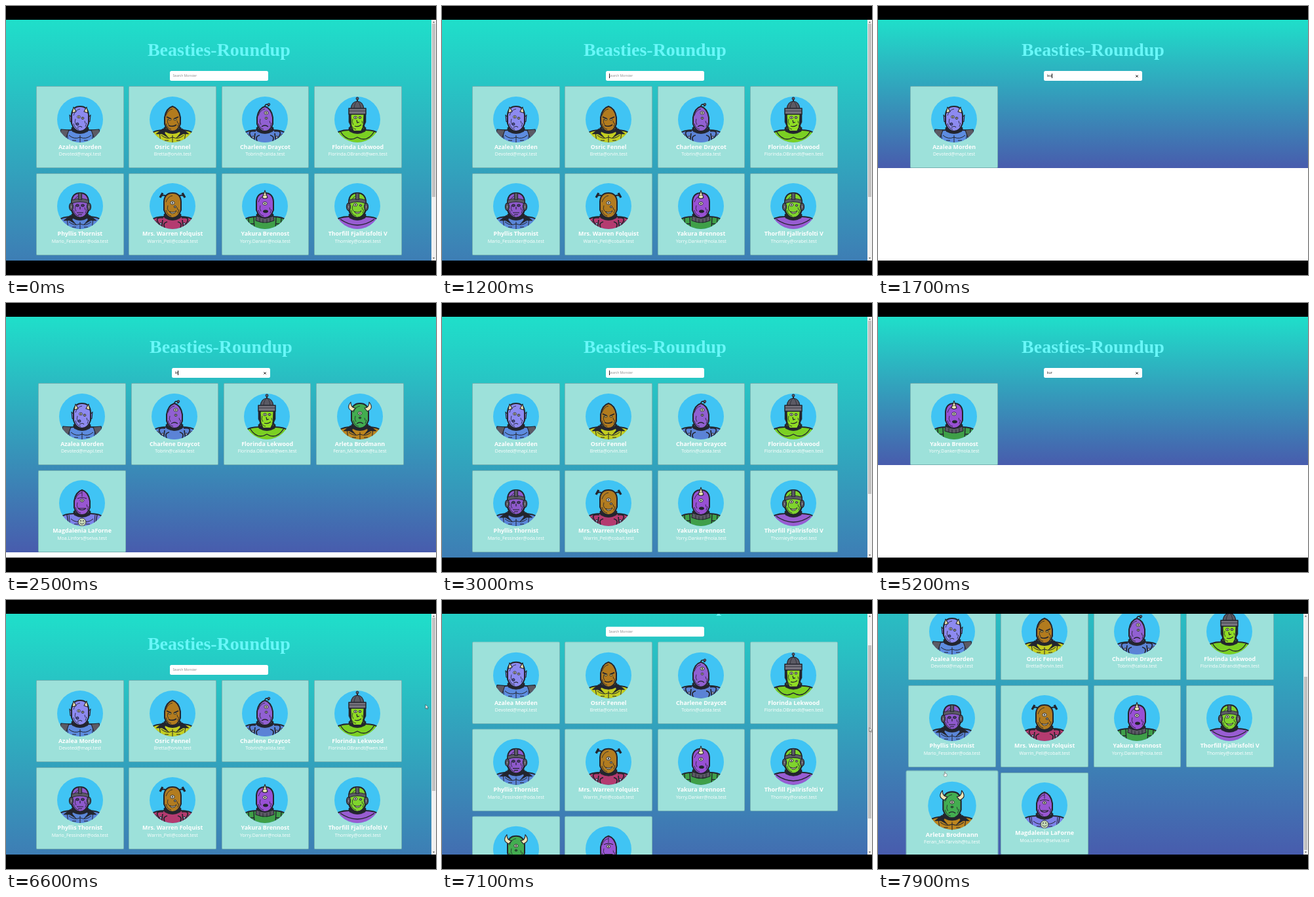
Write an HTML page that moves like this. It is 656 by 410 pixels and loops after 8000 ms.

```html
<!DOCTYPE html>
<html lang="en">
<head>
<meta charset="utf-8">
<title>Card search</title>
<style>
  html, body { margin: 0; width: 100%; height: 100%; overflow: hidden; background: #000; }
  #stage { position: relative; width: 656px; height: 410px; overflow: hidden; background: #000; font-family: "Open Sans", "Noto Sans", sans-serif; }
  #view { position: absolute; top: 21px; width: 656px; height: 367px; overflow: hidden; background: #fff; }
  #page { position: absolute; left: 0; top: 0; background: linear-gradient(#1fdfca, #485cad); }
  h1 { position: absolute; top: 29.6px; width: 100%; margin: 0; text-align: center; color: #68f7f8;
    font: bold 28px/32px "Liberation Serif", "Times New Roman", serif; }
  #box { position: absolute; top: 78px; left: calc(50% - 74.8px); width: 149.6px; height: 15px; box-sizing: border-box;
    padding-left: 4.6px; border-radius: 2.5px; background: #fff; font-size: 5.3px; line-height: 15px; color: #222; white-space: pre; }
  #hint { position: absolute; left: 4.6px; color: #8b8b8b; font-size: 5px; }
  #caret { display: inline-block; width: .8px; height: 7px; vertical-align: -1.6px; background: #111; }
  #clear { position: absolute; left: 139.4px; top: 5.6px; width: 4px; height: 4px; overflow: visible; }
  #grid { position: absolute; top: 101px; width: 100%; display: grid; grid-template-columns: repeat(4, 133.7px);
    grid-auto-rows: 125.4px; gap: 7.6px 7.6px; justify-content: center; }
  .card { position: relative; border-radius: 2px; background: #9de1da; color: #fff; text-align: center; white-space: nowrap;
    box-shadow: inset 0 0 0 .7px rgba(70, 120, 130, .6); }
  .card svg { position: absolute; left: 31.6px; top: 15.5px; width: 70px; height: 70px; border-radius: 50%; background: #40c4f4; }
  .card b, .card i { position: absolute; left: 0; width: 100%; }
  .card b { top: 86.5px; font: 700 8.9px/12px "Open Sans", "Noto Sans", sans-serif; }
  .card i { top: 99px; font: 400 7px/10px "Open Sans", "Noto Sans", sans-serif; }
  #bar { position: absolute; right: 0; top: 0; width: 7px; height: 367px; background: #f1f1f1; }
  #thumb { position: absolute; left: 1px; top: 6px; width: 5px; height: 264px; background: #c1c1c1; }
  #bar svg { position: absolute; left: 0; top: 0; }
  #mouse { position: absolute; left: 0; top: 0; width: 10px; height: 10px; overflow: visible; }
</style>
</head>
<body>
<div id="stage">
  <div id="view">
    <div id="page">
      <h1>Beasties-Roundup</h1>
      <div id="box"><span id="hint">Search Monster</span><span id="typed"></span><span id="caret"></span><svg id="clear" viewBox="0 0 4 4"><path d="M.3 .3 3.7 3.7M3.7 .3 .3 3.7" stroke="#222" stroke-width=".95"/></svg></div>
      <div id="grid"></div>
    </div>
    <div id="bar"><div id="thumb"></div><svg width="7" height="367"><path d="M1.8 4.5 3.5 2.5 5.2 4.5ZM1.8 362.5 3.5 364.5 5.2 362.5Z" fill="#555"/></svg></div>
  </div>
  <svg id="mouse"><path id="arrow" d="M0 0V6.2L1.5 4.9 2.4 7 3.4 6.6 2.5 4.5H4.4Z" fill="#fff" stroke="#222" stroke-width=".5"/><path id="hand" d="M-.6 0Q0-.9.6 0V2.4L3.2 3V5.2L2.4 7H-.7L-2.4 4.3-1.5 3.7-.6 4.5Z" fill="#fff" stroke="#555" stroke-width=".5"/></svg>
</div>
<script>
const $ = id => document.getElementById(id);
const INK = '#23252e', STEEL = '#5b5a64', BONE = '#f1e6b4';
const LOOP = 8000, TICK = 100;

// Small SVG helpers; avatars use a 70 by 70 box centred on 0,0
const path = (d, fill = 'none', w = 1.1) =>
  `<path d="${d}" fill="${fill}" stroke="${INK}" stroke-width="${w}" stroke-linejoin="round"/>`;
const oval = (x, y, rx, ry = rx, fill = '#fff', w = .9) =>
  `<ellipse cx="${x}" cy="${y}" rx="${rx}" ry="${ry}" fill="${fill}" stroke="${INK}" stroke-width="${w}"/>`;
const eye = (x, y, r = 2.4) => oval(x, y, r, r * .8, '#f3efd8') + oval(x, y, r * .35, r * .35, INK, .3);
const both = f => f(-1) + f(1);

const torso = fill => path('M-36 36V23Q-27 16-13 16L-10 10H10L13 16Q27 16 36 23V36Z', fill, 2)
  + path('M-13 12Q0 23 13 12L12 18Q0 25-12 18Z', INK, .8);
const skulls = {
  round: 'M-13-7Q-12-20 0-20Q12-20 13-7L13 6Q9 18 0 18Q-9 18-13 6Z',
  point: 'M-12-3Q-10-17 0-20Q10-17 12-3V7Q8 18 0 18Q-8 18-12 7Z',
  chin: 'M-11-9H11L10 10 6 18H-6L-10 10Z'
};
const skull = (shape, fill) => path(skulls[shape], fill, 2)
  + path('M-10-6Q-7-15 0-16M-10 6Q-8 14-2 15M10 5 8 11M-7-1Q-9 4-6 8M7 2 8 6', 'none', .8);
const ears = fill => both(s => path(`M${12 * s}-2L${16 * s}-7 ${15 * s} 3 ${12 * s} 5Z`, fill));
const muscle = path('M0 24V36M-17 24Q-9 31 0 27Q9 31 17 24M-20 18-18 36M20 18 18 36M-12 32H-6M12 32H6', 'none', 1);
const pads = both(s => path(`M${17 * s} 16L${29 * s} 15 ${36 * s} 36H${24 * s}Z`, STEEL));
const collar = both(s => path(`M${10 * s} 14L${15 * s} 14 ${25 * s} 22 ${16 * s} 22 ${6 * s} 28 ${12 * s} 21Z`, INK, .6));
const coils = both(s => path(`M${14 * s} 18Q${27 * s} 16 ${22 * s} 25T${27 * s} 36M${8 * s} 24Q${17 * s} 26 ${10 * s} 36M${15 * s} 21L${17 * s} 36`, 'none', 1.7)
  + oval(18 * s, 27, 1.8, 1.8, '#9aa6c8') + oval(26 * s, 24, 1.5, 1.5, '#b9c0d6'));
const ridge = path('M-13 15Q0 21 13 15L14 22Q0 28-14 22Z', STEEL) + path('M-8 18V24M-3 20V26M3 20V26M8 18V24', 'none', .9);
const frown = path('M-5 11Q0 7 5 11', 'none', 1.3);
const smirk = path('M-5 8Q1 11 6 7Q4 12-2 11Z', '#efe9c8', 1);
const brow = path('M-9-4-2-1M9-4 2-1', 'none', 1.8);
const helm = path('M-13-9Q0-14 13-9V-4Q0-9-13-4Z', STEEL) + path('M-2.5-20H2.5V-10H-2.5Z', STEEL)
  + both(s => oval(13.5 * s, 1, 3, 5.5, STEEL, 1.3) + oval(13.5 * s, 1, 1.2, 2.5, '#a09da8', .6))
  + path('M-13 6Q-9 18 0 18Q9 18 13 6', 'none', 2.4);

const avatars = [
  torso('#5d8ce0') + muscle + pads + ears('#8181e8') + skull('round', '#8d8af0')
    + both(s => path(`M${6 * s}-12L${10 * s}-19 ${12 * s}-10Z`, BONE))
    + eye(-2, -4, 2.4) + eye(4, -2, 2) + oval(-4, 7, 2, 2, '#4a4a9e') + path('M-4 12Q1 9 3 12'),
  torso('#c4ce20') + muscle + collar + skull('point', '#b27b1e')
    + brow + both(s => oval(4 * s, 0, 2.3, 1.1, '#f4d75b')) + path('M-6 9Q0 12 6 8', 'none', 1.6),
  torso('#5b83d6') + coils + path('M0-18Q-1-24 5-23Q8-20 4-21', 'none', 1.6) + oval(6, -23, 1.8, 1.8, STEEL)
    + skull('point', '#9160d2') + eye(2, -10, 3) + eye(2, -2, 2) + frown,
  torso('#7bd023') + path('M-26 18Q-15 36 0 27Q15 36 26 18', 'none', 1.4) + skull('chin', '#90dc24')
    + path('M0-33V-26', 'none', 2) + oval(0, -32, 2, 2, STEEL)
    + path('M-10-16Q-9-27 0-28Q9-27 10-16Z', STEEL) + path('M-5-17Q-4-26 0-28Q4-26 5-17', 'none', .7)
    + path('M-13-17H13V-8H-13Z', '#77747e', 1.5) + path('M-13-13H13', 'none', .8)
    + both(s => path(`M${10 * s}-8H${13 * s}V4L${9 * s} 12Z`, INK, .6))
    + eye(-3, -3) + eye(4, -3, 2) + path('M-1 1 0 5 3 4M-4 10Q1 12 6 8', 'none', 1.3),
  torso('#5b86d8') + muscle + collar + skull('round', '#8e59cc') + helm
    + both(s => oval(4 * s, -1, 2.5, 1.8, '#463668')) + path('M0 1V5M-5 10H5M-3 13H3', 'none', 1.2),
  torso('#b43b70') + coils + both(s => path(`M${8 * s}-13Q${11 * s}-18 ${17 * s}-16`, 'none', 2)
    + path(`M${15 * s}-20L${19 * s}-13`, 'none', 3.4)) + skull('round', '#b27c20')
    + eye(0, -5, 3.2) + eye(4, 1, 1.8) + smirk,
  torso('#3f9f48') + both(s => path(`M${17 * s} 17L${16 * s} 36M${25 * s} 18L${24 * s} 36M${17 * s} 27H${24 * s}`, 'none', 1.4)) + ridge
    + skull('round', '#9850d4') + path('M-4-13 0-24 4-13Q0-10-4-13Z', BONE)
    + path('M-3-16 3-17M-2-20H2', 'none', .6) + eye(0, -4, 3.2) + oval(1, 8, 3.6, 2, INK),
  torso('#985dd2') + path('M-26 20Q0 38 26 20', 'none', 1.4) + skull('round', '#7fd42d') + helm
    + eye(-3, -2, 2.8) + eye(5, -1, 1.8) + smirk,
  torso('#bd861f') + muscle + collar + skull('round', '#43ad50')
    + both(s => path(`M${7 * s}-13Q${14 * s}-13 ${14 * s}-22Q${22 * s}-12 ${11 * s}-8Z`, BONE))
    + eye(0, -5, 3) + oval(0, 2, 1.8, 1.2, '#2c7636') + frown,
  torso('#7d80e8') + muscle + both(s => path(`M${23 * s} 18L${20 * s} 36`, 'none', 1.4)) + skull('point', '#9956d2')
    + path('M0-20V-10', 'none', .8) + eye(0, -4, 2.8) + path('M-7-7Q0-10 7-7M-6 8H6Q0 13-6 8')
    + oval(0, 29, 6, 6, '#c7d9b8') + oval(-2, 27, .6, 1, INK, .2) + oval(2, 27, .6, 1, INK, .2) + path('M-3.5 30Q0 34 3.5 30', 'none', .8)
];

const people = [
  ['Azalea Morden', 'Devoted@mapl.test'],
  ['Osric Fennel', 'Bretta@orvin.test'],
  ['Charlene Draycot', 'Tobrin@calida.test'],
  ['Florinda Lekwood', 'Florinda.OBrandt@wen.test'],
  ['Phyllis Thornist', 'Mario_Fessinder@oda.test'],
  ['Mrs. Warren Folquist', 'Warrin_Pell@cobalt.test'],
  ['Yakura Brennost', 'Yorry.Danker@nola.test'],
  ['Thorfill Fjallrisfolti V', 'Thornley@orabel.test'],
  ['Arleta Brodmann', 'Feran_McTarvish@tu.test'],
  ['Magdalenia LaForne', 'Moa.Linfors@selva.test']
];
$('grid').innerHTML = people.map(([name, mail], i) =>
  `<div class="card"><svg viewBox="-35 -35 70 70">${avatars[i]}</svg><b>${name}</b><i>${mail}</i></div>`).join('');
const cards = [...$('grid').children];
const HOVERED = 8;

// Search text by time; the first entry is the click into the box
const keys = [
  [200, ''], [1500, 'l'], [1600, 'le'], [1700, 'lea'], [2500, 'le'], [2700, 'l'], [2800, ''],
  [4400, 'k'], [4600, 'ku'], [4700, 'kur'], [5700, 'ku'], [5800, 'k'], [6000, '']
];
// Pointer: time, x, y
const track = [
  [6500, 622, 156], [6600, 640, 159.5], [6700, 640, 159.5], [6800, 652, 156],
  [7500, 652, 246], [7600, 622, 258], [7700, 180, 272], [7800, 110, 267], [7900, 102, 262]
];

const ramp = (t, from, to) => Math.min(1, Math.max(0, (t - from) / (to - from)));
const show = (el, on) => { el.style.display = on ? '' : 'none'; };

function pointerAt(t) {
  const i = Math.max(1, track.findIndex(p => p[0] >= t));
  const [a, b] = t > track.at(-1)[0] ? track.slice(-2) : [track[i - 1], track[i]];
  const k = ramp(t, a[0], b[0]);
  return [a[1] + (b[1] - a[1]) * k, a[2] + (b[2] - a[2]) * k];
}

function draw(t) {
  const [since, text] = keys.findLast(k => k[0] <= t) || [0, ''];
  let count = 0;
  cards.forEach((card, i) => {
    const hit = people[i][0].toLowerCase().includes(text);
    show(card, hit);
    count += hit;
  });
  const height = 93 + Math.ceil(count / 4) * 133;
  const scrolls = height > 367;
  const drag = ramp(t, 6750, 7500);

  $('page').style.width = (scrolls ? 649.6 : 656) + 'px';
  $('page').style.height = height + 'px';
  $('page').style.transform = `translateY(${-125 * drag}px)`;
  show($('bar'), scrolls);
  $('thumb').style.transform = `translateY(${90 * drag}px)`;

  $('typed').textContent = text;
  show($('hint'), !text);
  show($('clear'), text);
  const lit = t >= 200 && t < 6500 && Math.floor((t - since) / 500) % 2 === 0;
  $('caret').style.visibility = lit ? 'visible' : 'hidden';

  const grow = 1 - (1 - ramp(t, 7600, 7880)) ** 2;
  cards[HOVERED].style.transform = grow ? `scale(${1 + .05 * grow})` : '';

  show($('mouse'), t >= 6500);
  const [x, y] = pointerAt(t);
  $('mouse').style.transform = `translate(${x}px, ${y}px)`;
  show($('arrow'), t < 7700);
  show($('hand'), t >= 7700);
}

const start = performance.now();
function frame() {
  const t = (performance.now() - start) % LOOP;
  draw(Math.floor(t / TICK) * TICK);
  requestAnimationFrame(frame);
}
frame();
</script>
</body>
</html>
```
